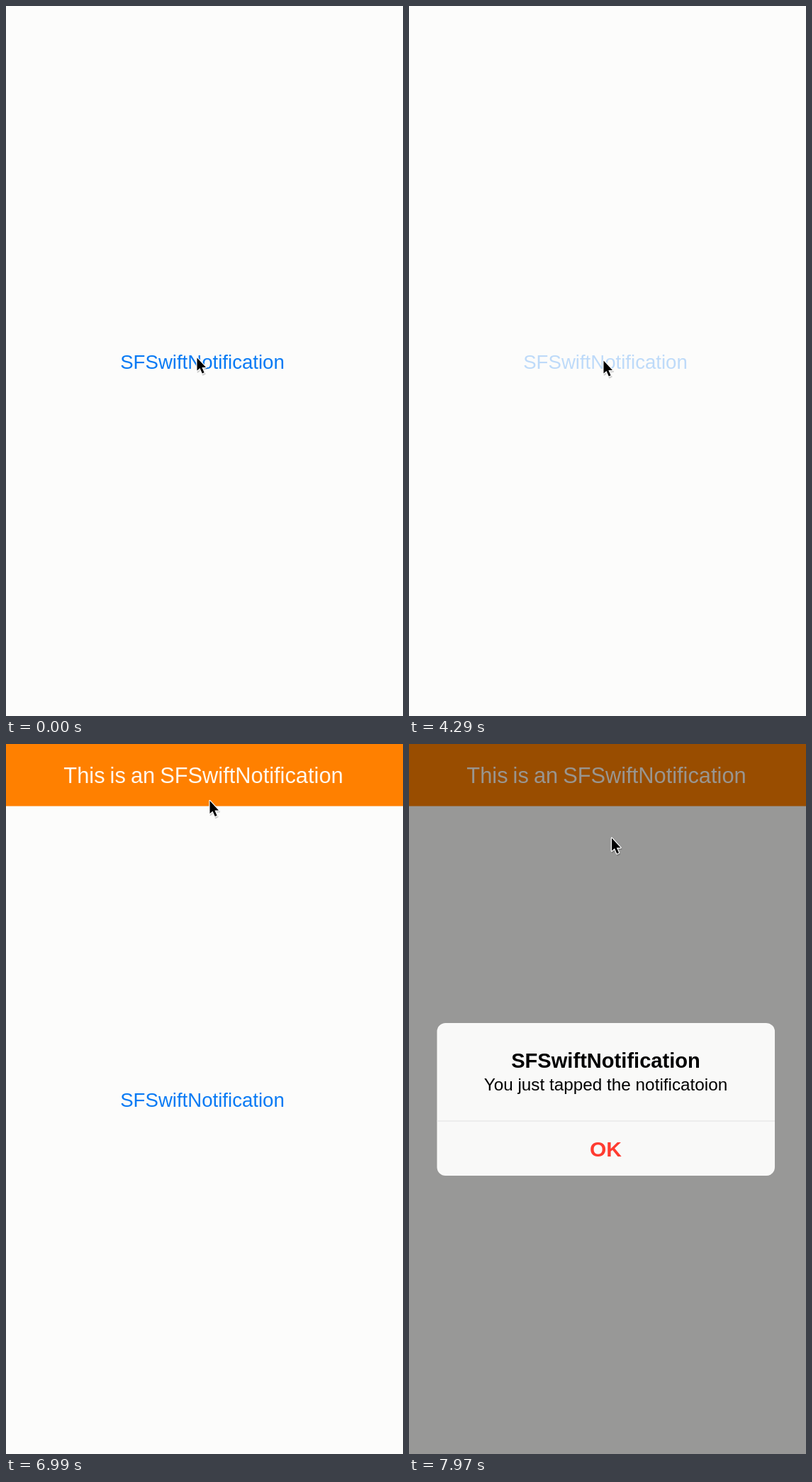
An HTML page that plays this animation: 560x1000 px, repeating every 8000 ms.

```html
<!DOCTYPE html>
<html lang="en">
<head>
<meta charset="utf-8">
<title>Notification demo</title>
<style>
  html, body { margin: 0; width: 100%; height: 100%; overflow: hidden; background: #fcfcfb; }
  svg { display: block; width: 560px; height: 1000px; }
  text { font-family: "Liberation Sans", Arial, sans-serif; text-anchor: middle; }
  .bold { font-weight: bold; }
</style>
</head>
<body>
<svg viewBox="0 0 560 1000">
  <defs>
    <path id="arrow" d="M1.5 2.5V20.5L5.5 17L8.8 24.5L11.6 23.2L8.4 16H14Z"/>
  </defs>
  <rect width="560" height="1000" fill="#fcfcfb"/>
  <text id="button" x="277" y="510.5" font-size="27.6">SFSwiftNotification</text>
  <g id="banner">
    <rect width="560" height="87.5" fill="#ff8000"/>
    <text x="278.5" y="54.5" font-size="30.8" word-spacing="-1.5" fill="#fff8ee">This is an SFSwiftNotification</text>
  </g>
  <rect id="dim" width="560" height="1000"/>
  <g id="alert">
    <rect x="39.5" y="393" width="476.5" height="215" rx="12" fill="#f9f9f8"/>
    <path d="M39.5 531H516" stroke="#e2e2e4"/>
    <text class="bold" x="277.5" y="456" font-size="29.1">SFSwiftNotification</text>
    <text x="277.5" y="488.5" font-size="24.3">You just tapped the notificatoion</text>
    <text class="bold" x="277.5" y="581" font-size="30" fill="#ff3b30">OK</text>
  </g>
  <g id="cursor" stroke-linejoin="round">
    <use href="#arrow" x="1" y="2" opacity=".18" stroke="#000" stroke-width="2"/>
    <use href="#arrow" stroke="#fff" stroke-width="2.4"/>
    <use href="#arrow"/>
  </g>
</svg>
<script>
const LOOP = 8000;
const [button, banner, dim, alertBox, cursor] =
  ["button", "banner", "dim", "alert", "cursor"].map(id => document.getElementById(id));

const clamp = v => Math.min(1, Math.max(0, v));
const mix = (a, b, k) => a + (b - a) * k;
const easeIn = k => k * k;
const easeOut = k => 1 - (1 - k) ** 2;
const smooth = k => k * k * (3 - 2 * k);
const move = (node, x, y) => node.setAttribute("transform", `translate(${x} ${y})`);

// Sideways gravity with an inelastic wall at the right edge.
function bannerX(t) {
  const g = 3500, bounce = 0.313, start = 4390;
  let s = (t - start) / 1000;
  if (s < 0) return -600;
  const fall = Math.sqrt(2 * 560 / g);
  if (s < fall) return g * s * s / 2 - 560;
  s -= fall;
  let speed = g * fall * bounce;
  while (speed > 20) {
    const flight = 2 * speed / g;
    if (s < flight) return g * s * s / 2 - speed * s;
    s -= flight;
    speed *= bounce;
  }
  return 0;
}

// Each key: time, x, y, easing of the move that arrives there.
const path = [
  [1800, 268, 493],
  [2400, 273, 497, smooth],
  [4750, 273, 497, smooth],
  [5270, 269.5, 368.5, easeIn],
  [5900, 286, 77.5, easeOut],
  [7600, 286, 77.5, smooth],
  [7970, 284.5, 130, easeIn]
];

function cursorAt(t) {
  const i = path.findIndex(key => key[0] > t);
  if (i === 0) return path[0].slice(1, 3);
  if (i < 0) return path[path.length - 1].slice(1, 3);
  const [t0, x0, y0] = path[i - 1], [t1, x1, y1, ease] = path[i];
  const k = ease((t - t0) / (t1 - t0));
  return [mix(x0, x1, k), mix(y0, y1, k)];
}

// Critically damped spring from 0 to 1.
function alertProgress(t) {
  const s = Math.max(0, t - 7037) * 0.018;
  return 1 - (1 + s) * Math.exp(-s);
}

function draw(t) {
  const shown = alertProgress(t);
  const tint = [8, 122, 244].map(c => Math.round(mix(c, 102, shown)));
  button.setAttribute("fill", `rgb(${tint})`);
  button.setAttribute("opacity", t < 4285 ? 1 : mix(0.25, 1, smooth(clamp((t - 4390) / 250))));

  move(banner, bannerX(t), 0);
  dim.setAttribute("opacity", 0.4 * shown);
  alertBox.setAttribute("opacity", shown);
  alertBox.setAttribute("transform",
    `translate(277.5 500.5) scale(${mix(1.2, 1, shown)}) translate(-277.5 -500.5)`);
  move(cursor, ...cursorAt(t));
}

const begin = performance.now();
function tick() {
  draw((performance.now() - begin) % LOOP);
  requestAnimationFrame(tick);
}
draw(0);
requestAnimationFrame(tick);
</script>
</body>
</html>
```
